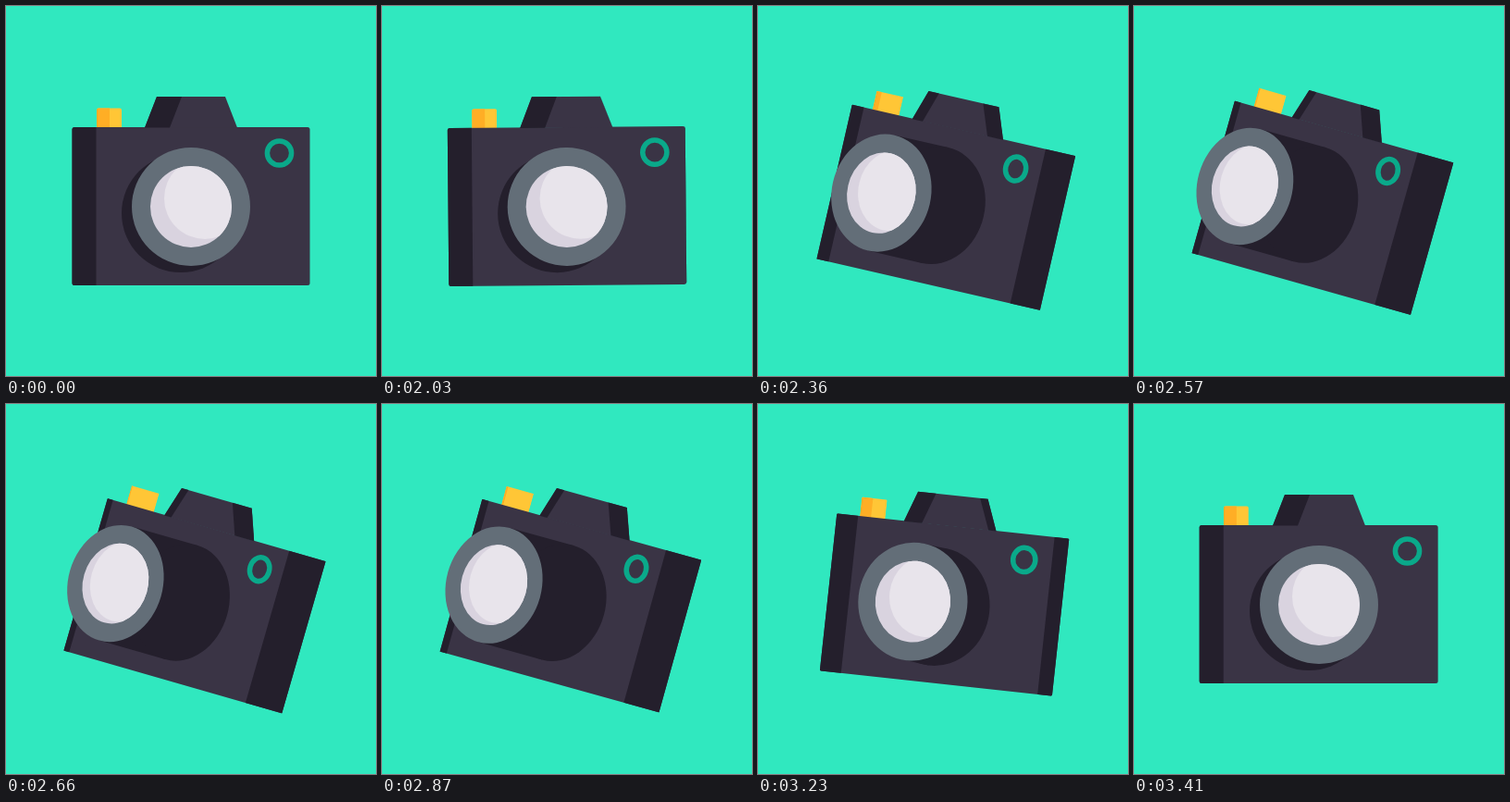
Recreate the animation shown at these times as an HTML page. Size 400 by 400 pixels, loop 3.5 s.

```html
<!DOCTYPE html>
<html lang="en">
<head>
<meta charset="utf-8">
<title>Camera</title>
<style>
  html, body { margin: 0; width: 100%; height: 100%; overflow: hidden; background: #30e8bf; }
  svg { display: block; width: 100%; height: 100%; }
  .front { fill: #3a3445; }
  .dark { fill: #241f2c; }
</style>
</head>
<body>
<svg viewBox="0 0 400 400">
  <defs>
    <clipPath id="bodyClip"><rect id="bodyShape" y="-85.5" height="171"/></clipPath>
    <clipPath id="buttonClip"><rect id="buttonShape" y="-106" height="28"/></clipPath>
    <clipPath id="glassClip"><ellipse id="glassShape"/></clipPath>
  </defs>
  <rect width="400" height="400" fill="#30e8bf"/>
  <g id="camera">
    <g clip-path="url(#buttonClip)">
      <rect id="button" y="-107" height="30" fill="#ffc636"/>
      <rect id="buttonSide" y="-107" height="30" fill="#ffae25"/>
    </g>
    <g clip-path="url(#bodyClip)">
      <rect x="-140" y="-90" width="280" height="180" class="front"/>
      <rect id="left" y="-90" height="180" class="dark"/>
      <rect id="right" y="-90" height="180" class="dark"/>
    </g>
    <path id="hump" class="front"/>
    <path id="humpLeft" class="dark"/>
    <path id="humpRight" class="dark"/>
    <ellipse id="dial" cy="-57.5" fill="none" stroke="#0aa98a" stroke-width="5.5"/>
    <path id="barrel" class="dark"/>
    <ellipse id="base" class="dark"/>
    <ellipse id="ring" fill="#636e78"/>
    <ellipse id="glass" fill="#d9d3df"/>
    <g clip-path="url(#glassClip)"><ellipse id="shine" fill="#e8e4eb"/></g>
  </g>
</svg>
<script>
const LOOP = 3500, START = 2030, STEP = 30, LAST = 3410;
const PEAK = 2700, RISE = 690, FALL = 710, TILT = 16.1;
const $ = id => document.getElementById(id);
const clamp = (v, lo, hi) => Math.min(hi, Math.max(lo, v));

function set(id, attrs) {
  const el = $(id);
  for (const k in attrs) el.setAttribute(k, attrs[k]);
}
const ellipse = (id, cx, cy, rx, ry) => set(id, { cx, cy, rx, ry });
const span = (id, x, width) => set(id, { x, width: Math.max(0, width) });
const poly = (id, ...pts) => set(id, { d: 'M' + pts.map(p => p.join(' ')).join('L') + 'Z' });

// Cubic bezier easing with end handles at heights 0 and 1
function ease(x) {
  const x1 = 0.26, x2 = 0.22;
  let lo = 0, hi = 1;
  for (let i = 0; i < 30; i++) {
    const s = (lo + hi) / 2, r = 1 - s;
    if (3 * r * r * s * x1 + 3 * r * s * s * x2 + s * s * s < x) lo = s;
    else hi = s;
  }
  return lo * lo * (3 - 2 * lo);
}

function pose(t) {
  if (t < START) return { turn: 0, tilt: 0, body: 0 };
  t = Math.min(LAST, START + Math.floor((t - START) / STEP) * STEP);
  const x = t < PEAK ? 1 - (PEAK - t) / RISE : 1 - (t - PEAK) / FALL;
  const turn = TILT * ease(clamp(x, 0, 1));
  // Small wind-up before the swing, small stretch after it
  const windUp = 0.75 * Math.sin(Math.PI * clamp((t - 2005) / 90, 0, 1));
  const stretch = 1.3 * clamp((t - 3310) / 100, 0, 1);
  return { turn, tilt: turn - windUp, body: turn - stretch };
}

function draw(time) {
  const { turn: a, tilt, body: b } = pose(time);
  const sx = 1 - 0.0125 * a;
  set('camera', { transform: `translate(200 ${216.5 + 0.04 * a}) rotate(${tilt})` });

  // Body
  const l = -128.5 + 0.62 * b, r = 128.5 - 0.1 * b;
  const side = 2.55 * Math.max(0, b);
  set('bodyShape', { x: l, width: r - l, rx: clamp(2.5 - a / 5, 0.5, 2.5) });
  span('left', l - 2, 28 - 0.077 * a * a);
  span('right', r - side, side && side + 2);

  // Shutter button
  const bw = 27 + 0.015 * a * a;
  const bx = -88.5 + 0.42 * b - bw / 2 - (b < 0 ? 0.6 : 0);
  set('buttonShape', { x: bx, width: bw, rx: clamp(2 - a / 8, 0.5, 2) });
  span('button', bx, bw);
  span('buttonSide', bx, 14 - 0.05 * a * a);

  // Viewfinder
  const top = -118.5, foot = -85;
  const tl = -37 - 0.47 * a, tr = 37 - 0.17 * a;
  const bl = -50 - 0.28 * a, br = 50 - 0.22 * a;
  const lw = 27 - 1.2 * a, rw = 1.35 * a;
  poly('hump', [bl, foot], [tl, top], [tr, top], [br, foot]);
  poly('humpLeft', [bl, foot], [tl, top], [tl + lw, top], [bl + lw, foot]);
  poly('humpRight', [br, foot], [tr, top], [tr - rw, top], [br - rw, foot]);

  ellipse('dial', 95.5 - 2.17 * a, -57.5, 13.1 * sx, 13.1);

  // Lens: the resting shadow becomes the foot of the barrel
  const rest = 1 - Math.min(1, a / 10);
  const cx = -5.28 * a, cy = 0.4;
  const fx = -0.66 * a - 11 * rest, fy = 0.4 + 7.2 * rest;
  ellipse('base', fx, fy, 64 * sx, 64);
  poly('barrel', [cx, cy - 64], [fx, fy - 64], [fx, fy + 64], [cx, cy + 64]);
  ellipse('ring', cx, cy, 64 * sx, 64);
  const gx = 44 * sx;
  ellipse('glass', cx, cy, gx, 44);
  ellipse('glassShape', cx, cy, gx, 44);
  ellipse('shine', cx + 15 - 0.0018 * a ** 3, cy - 9 + 0.3 * a, gx, 44);
}

let begin = null;
function tick(now) {
  if (begin === null) begin = now;
  draw((now - begin) % LOOP);
  requestAnimationFrame(tick);
}
draw(0);
requestAnimationFrame(tick);
</script>
</body>
</html>
```
